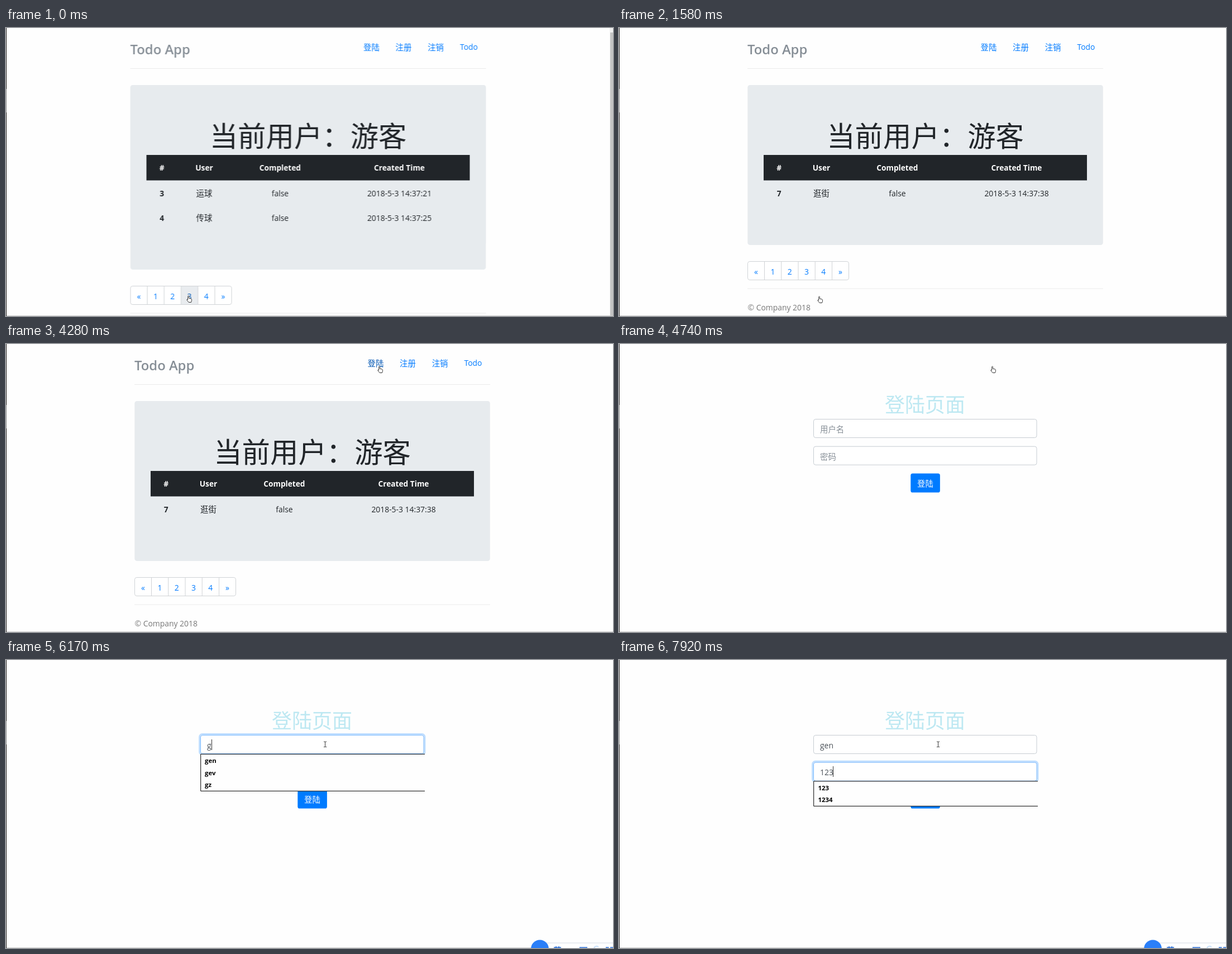
Write an HTML page that moves like this. It is 1087x515 px and loops after 8000 ms.

```html
<!DOCTYPE html>
<html lang="zh-CN">
<head>
<meta charset="utf-8">
<title>Todo App</title>
<style>
html, body { margin: 0; width: 100%; height: 100%; overflow: hidden; background: #fefefe; }
svg { display: block; width: 100%; height: 100%; }
text { font: 13.9px 'Open Sans', 'Noto Sans CJK SC', 'Noto Sans CJK', sans-serif; fill: #212529; }
.mid text, .mid { text-anchor: middle; }
.b { font-weight: 700; font-size: 13.7px; }
.zh { font-size: 14.4px; }
.link text { fill: #007bff; }
.head text { fill: #fff; font-weight: 700; font-size: 13.7px; }
.list text { fill: #000; font-weight: 700; font-size: 11.4px; }
.hint { fill: #868e96; }
.typed text { fill: #495057; }
.rule { stroke: #ebebeb; }
.field { fill: #fff; stroke: #c6ccd2; }
.glow rect { fill: #fff; stroke: #80bdff; }
.glow rect:first-child { fill: none; stroke: #bfdeff; stroke-width: 3; }
.drop rect { fill: #fefefe; }
.drop path { fill: none; stroke: #000; }
.cur path { fill: #fff; stroke: #222; stroke-width: .9; stroke-linejoin: round; }

/* percent = ms / 80 */
.k, .m { animation: 8s step-end infinite; }
.k { opacity: 0; }

#home { animation-name: home; }
@keyframes home { 0% { opacity: 1; transform: translateX(-7.5px); } 19.75% { opacity: 1; transform: none; } 59.25%, to { opacity: 0; } }
#foot { animation-name: foot; }
@keyframes foot { 0% { transform: translateY(44px); } 19.75%, to { transform: none; } }
#tall, #bar { animation-name: tall; }
@keyframes tall { 0% { opacity: 1; } 19.75%, to { opacity: 0; } }
#page2 { animation-name: page2; }
@keyframes page2 { 0% { opacity: 1; } 5.375%, to { opacity: 0; } }
#page3 { animation-name: page3; }
@keyframes page3 { 5.375% { opacity: 1; } 19.75%, to { opacity: 0; } }
#page4 { animation-name: page4; }
@keyframes page4 { 19.75%, to { opacity: 1; } }
#over { animation-name: over; }
@keyframes over { 0% { opacity: 1; transform: none; } 9.125% { opacity: 1; transform: translateX(30.2px); } 19.75%, to { opacity: 0; } }
#n3 { animation-name: n3; }
@keyframes n3 { 0% { fill: #0056b3; } 9.125%, to { fill: #007bff; } }
#n4 { animation-name: n4; }
@keyframes n4 { 9.125% { fill: #0056b3; } 19.75%, to { fill: #007bff; } }
#enter { animation-name: enter; }
@keyframes enter { 48.75%, to { fill: #0056b3; } }

#login { animation-name: login; }
@keyframes login { 59.25%, to { opacity: 1; } }
#ime { animation-name: ime; }
@keyframes ime { 66.125%, to { opacity: 1; } }
#glow1 { animation-name: glow1; }
@keyframes glow1 { 67.875% { opacity: 1; } 89.25% { opacity: .4; } 90.75%, to { opacity: 0; } }
#glow2 { animation-name: glow2; }
@keyframes glow2 { 89.25% { opacity: .6; } 90.75%, to { opacity: 1; } }
#hint1 { animation-name: hint1; }
@keyframes hint1 { 0% { opacity: 1; } 77.125%, to { opacity: 0; } }
#hint2 { animation-name: hint2; }
@keyframes hint2 { 0% { opacity: 1; } 94.125%, to { opacity: 0; } }
#g1, #names { animation-name: g1; }
@keyframes g1 { 77.125% { opacity: 1; } 79%, to { opacity: 0; } }
#g3 { animation-name: g3; }
@keyframes g3 { 79%, to { opacity: 1; } }
#name { animation-name: name; }
@keyframes name { 79% { opacity: 1; } 89.25%, to { opacity: 0; } }
#p1 { animation-name: p1; }
@keyframes p1 { 94.125% { opacity: 1; } 95.625%, to { opacity: 0; } }
#p2 { animation-name: p2; }
@keyframes p2 { 95.625% { opacity: 1; } 99%, to { opacity: 0; } }
#codes { animation-name: codes; }
@keyframes codes { 94.125% { opacity: 1; } 99%, to { opacity: 0; } }
#p3, #code { animation-name: p3; }
@keyframes p3 { 99%, to { opacity: 1; } }
#caret { animation-name: caret; }
@keyframes caret {
  66.125% { opacity: 1; transform: translate(360px, 142px); }
  73.375% { opacity: 0; }
  77.125% { opacity: 1; transform: translate(368px, 142px); }
  79% { opacity: 1; transform: translate(383px, 142px); }
  85.875% { opacity: 0; }
  89.25% { opacity: 1; transform: translate(360px, 190px); }
  94.125% { opacity: 1; transform: translate(368px, 190px); }
  95.625% { opacity: 1; transform: translate(375px, 190px); }
  99%, to { opacity: 1; transform: translate(383px, 190px); }
}

#cursor { animation-name: move; }
@keyframes move {
  0% { transform: translate(323px, 478px); }
  7.5% { transform: translate(337px, 480px); }
  9.125% { transform: translate(348px, 479px); }
  11.125% { transform: translate(353px, 479px); }
  12.75% { transform: translate(355px, 479px); }
  26.5% { transform: translate(358px, 479px); }
  28.375% { transform: translate(330px, 470px); }
  29.875% { transform: translate(292px, 456px); }
  31.375% { transform: translate(270px, 449px); }
  33.25% { transform: translate(261px, 446px); }
  36.5% { transform: translate(430px, 334px); }
  38% { transform: translate(602px, 220px); }
  39.5% { transform: translate(634px, 186px); }
  41.125% { transform: translate(645px, 169px); }
  43% { transform: translate(699px, 134px); }
  44.875% { transform: translate(713px, 97px); }
  46.875% { transform: translate(699px, 61px); }
  48.75% { transform: translate(682px, 46px); }
  50.375% { transform: translate(674px, 42px); }
  51.875% { transform: translate(667px, 40px); }
  53.5% { transform: translate(665px, 39px); }
  61.125% { transform: translate(649px, 57px); }
  63% { transform: translate(612px, 100px); }
  64.625% { transform: translate(578px, 144px); }
  66.125%, to { transform: translate(569px, 145px); }
}
#hand { animation-name: hand; }
@keyframes hand { 0% { opacity: 1; } 26.5% { opacity: 0; } 48.75% { opacity: 1; } 61.125%, to { opacity: 0; } }
#arrow { animation-name: arrow; }
@keyframes arrow { 26.5% { opacity: 1; } 48.75% { opacity: 0; } 61.125% { opacity: 1; } 64.625%, to { opacity: 0; } }
#beam { animation-name: beam; }
@keyframes beam { 64.625%, to { opacity: 1; } }
</style>
</head>
<body>
<svg viewBox="0 0 1087 515">
  <g id="home" class="k">
    <text x="230" y="46.5" style="font-size:23.8px;font-weight:600;fill:#868e96">Todo App</text>
    <g class="link">
      <text id="enter" class="zh m" x="647.5" y="39.5">登陆</text>
      <text class="zh" x="705" y="39.5">注册</text>
      <text class="zh" x="762.7" y="39.5">注销</text>
      <text x="820.5" y="39">Todo</text>
    </g>
    <path class="rule" d="M230 72.5H867"/>
    <rect x="230.3" y="102" width="636.5" height="286" rx="4.3" fill="#e7ebee"/>
    <rect id="tall" class="k" x="230.3" y="102" width="636.5" height="330" rx="4.3" fill="#e7ebee"/>
    <text class="mid" x="548.6" y="212" style="font-size:50.4px;font-weight:300">当前用户：游客</text>
    <rect x="259" y="227" width="579" height="45.5" fill="#212529"/>

    <g id="page2" class="k mid">
      <g class="head"><text y="255"><tspan x="286.7">#</tspan><tspan x="362.5">User</tspan><tspan x="498.4">Completed</tspan><tspan x="712">Created Time</tspan></text></g>
      <text y="300.5"><tspan class="b" x="286.7">3</tspan><tspan class="zh" x="362.5">运球</tspan><tspan x="498.4">false</tspan><tspan x="712">2018-5-3 14:37:21</tspan></text>
      <text y="344.5"><tspan class="b" x="286.7">4</tspan><tspan class="zh" x="362.5">传球</tspan><tspan x="498.4">false</tspan><tspan x="712">2018-5-3 14:37:25</tspan></text>
    </g>
    <g id="page3" class="k mid">
      <g class="head"><text y="255"><tspan x="285.5">#</tspan><tspan x="369">User</tspan><tspan x="511">Completed</tspan><tspan x="716.7">Created Time</tspan></text></g>
      <text y="300.5"><tspan class="b" x="285.5">5</tspan><tspan class="zh" x="369">打篮球</tspan><tspan x="511">false</tspan><tspan x="716.7">2018-5-3 14:37:30</tspan></text>
      <text y="344.5"><tspan class="b" x="285.5">6</tspan><tspan class="zh" x="369">投篮</tspan><tspan x="511">false</tspan><tspan x="716.7">2018-5-3 14:37:34</tspan></text>
    </g>
    <g id="page4" class="k mid">
      <g class="head"><text y="255"><tspan x="286.7">#</tspan><tspan x="362.5">User</tspan><tspan x="498.4">Completed</tspan><tspan x="712">Created Time</tspan></text></g>
      <text y="300.5"><tspan class="b" x="286.7">7</tspan><tspan class="zh" x="362.5">逛街</tspan><tspan x="498.4">false</tspan><tspan x="712">2018-5-3 14:37:38</tspan></text>
    </g>

    <g id="foot" class="m">
      <rect x="230.5" y="417.5" width="181" height="33" rx="3.6" fill="#fff"/>
      <rect id="over" class="k" x="321" y="417.5" width="30" height="33" fill="#e9ecef"/>
      <rect x="230.5" y="417.5" width="181" height="33" rx="3.6" fill="none" stroke="#d0d3d6"/>
      <path d="M260.5 417.5v33M290.7 417.5v33M321 417.5v33M351.2 417.5v33M381.5 417.5v33" stroke="#d0d3d6"/>
      <g class="link mid">
        <text x="245.4" y="440.5">«</text>
        <text x="275.6" y="440.5">1</text>
        <text x="305.8" y="440.5">2</text>
        <text id="n3" class="m" x="336" y="440.5">3</text>
        <text id="n4" class="m" x="366.3" y="440.5">4</text>
        <text x="396.5" y="440.5">»</text>
      </g>
      <path class="rule" d="M230 466H867"/>
      <text x="230.5" y="504.7" style="fill:#777">© Company 2018</text>
    </g>
  </g>
  <g id="bar" class="k">
    <rect x="1081" width="6" height="515" fill="#f1f1f1"/>
    <rect x="1082" y="8" width="5" height="506" fill="#c4c4c4"/>
  </g>

  <g id="login" class="k">
    <text class="mid" x="548" y="121.8" style="font-size:36px;fill:#bde8f2">登陆页面</text>
    <rect class="field" x="348.5" y="134.5" width="399.5" height="33" rx="3.6"/>
    <rect class="field" x="348.5" y="183.2" width="399.5" height="33" rx="3.6"/>
    <g id="glow1" class="k glow">
      <rect x="346.6" y="132.6" width="403.3" height="36.8" rx="5"/>
      <rect x="348.5" y="134.5" width="399.5" height="33" rx="3.6"/>
    </g>
    <g id="glow2" class="k glow">
      <rect x="346.6" y="181.3" width="403.3" height="36.8" rx="5"/>
      <rect x="348.5" y="183.2" width="399.5" height="33" rx="3.6"/>
    </g>
    <text id="hint1" class="k zh hint" x="360" y="158">用户名</text>
    <text id="hint2" class="k zh hint" x="360" y="206.5">密码</text>
    <rect x="522.3" y="231.5" width="52.6" height="34" rx="3.6" fill="#007bff"/>
    <text class="zh mid" x="548.5" y="255" style="fill:#fff">登陆</text>

    <g class="typed">
      <text id="g1" class="k" x="360" y="157.5">g</text>
      <text id="g3" class="k" x="360" y="157.5">gen</text>
      <text id="p1" class="k" x="360" y="206">1</text>
      <text id="p2" class="k" x="360" y="206">12</text>
      <text id="p3" class="k" x="360" y="206">123</text>
    </g>
    <g id="names" class="k drop list">
      <rect x="348" y="168" width="402" height="67"/>
      <path d="M750 168.3H348.7V234.3H750"/>
      <text x="356" y="184.3">gen</text><text x="356" y="205.8">gev</text><text x="356" y="227.3">gz</text>
    </g>
    <g id="name" class="k drop list">
      <rect x="348" y="168" width="402" height="23.5"/>
      <path d="M750 168.3H348.7V191.3H750"/>
      <text x="356" y="184.3">gen</text>
    </g>
    <g id="codes" class="k drop list">
      <rect x="348" y="216.5" width="402" height="66.5"/>
      <path d="M750 216.8H348.7V282.7H750"/>
      <text x="356.5" y="232.7">12</text><text x="356.5" y="254.2">123</text><text x="356.5" y="275.7">1234</text>
    </g>
    <g id="code" class="k drop list">
      <rect x="348" y="216.5" width="402" height="45"/>
      <path d="M750 216.8H348.7V261.3H750"/>
      <text x="356.5" y="232.7">123</text><text x="356.5" y="254.2">1234</text>
    </g>
    <rect id="caret" class="k" width="1" height="19" fill="#333"/>
  </g>

  <path d="M0 514.5H1087" stroke="#cfcfcf"/>
  <path d="M.5 0V515" stroke="#25211f"/>
  <path d="M.5 109V151" stroke="#8a8a8a"/>

  <g id="ime" class="k">
    <rect x="956" y="506" width="140" height="20" fill="#fff" stroke="#d5dbe3"/>
    <circle cx="956" cy="516.5" r="16" fill="#2b7ff8"/>
    <path d="M981 514H994M985 512V515M990 512V515M1027 514H1041M1074 514H1079.500M1082 514H1087" fill="none" stroke="#2b6fd6" stroke-width="1.6"/>
    <path d="M1053 515a5 5 0 0 1 8-2" fill="none" stroke="#c5def9" stroke-width="2"/>
  </g>

  <g id="cursor" class="m cur">
    <path id="hand" class="k" d="M2.600 8V1.700Q3.500 0 4.500 1.700V5.200L8.300 6Q9.500 6.300 9.500 7.600V9.500L8.500 12.500H4.200L.7 8.200Q.8 6.600 2.600 8Z"/>
    <path id="arrow" class="k" d="M.5 .5V9.800L2.700 7.800L4.200 11.400L5.700 10.800L4.200 7.300H7.200Z"/>
    <path id="beam" class="k" d="M0 1H2L2.500 1.500L3 1H5M0 10.500H2L2.500 10L3 10.500H5M2.500 1.500V10" style="fill:none"/>
  </g>
</svg>
</body>
</html>
```
